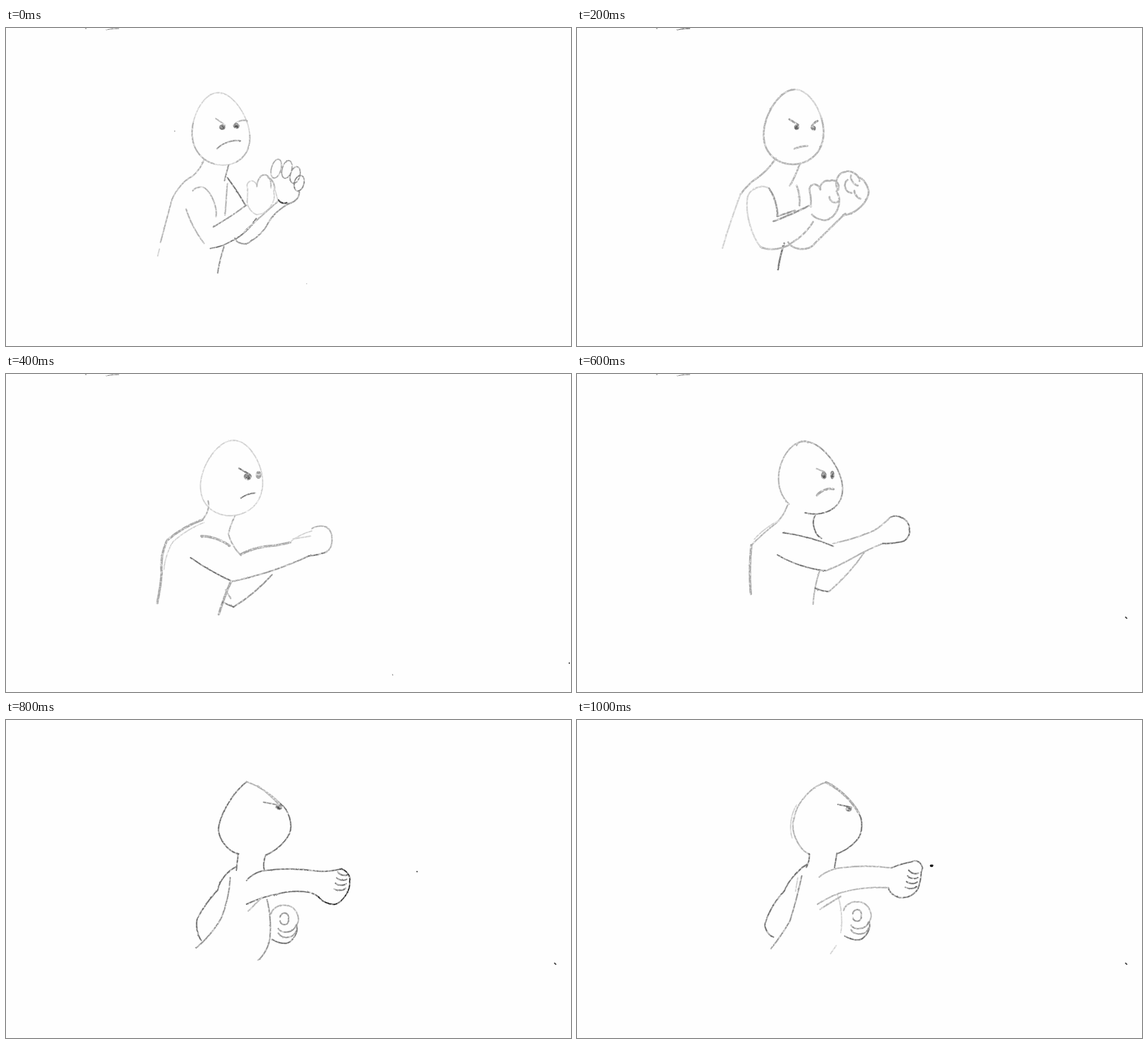
An HTML page that plays this animation: 998 by 561 pixels, repeating every 1200 ms.

```html
<!DOCTYPE html>
<html lang="en">
<head>
<meta charset="utf-8">
<title>Pencil punch</title>
<style>
  html, body { margin: 0; width: 100%; height: 100%; overflow: hidden; background: #fefefe; }
  svg { display: block; width: 100%; height: 100%; }
</style>
</head>
<body>
<svg id="stage" viewBox="0 0 998 561" fill="none" stroke-linecap="round" stroke-linejoin="round">
  <defs>
    <filter id="grain" filterUnits="userSpaceOnUse" x="0" y="0" width="998" height="561" color-interpolation-filters="sRGB">
      <feTurbulence type="fractalNoise" baseFrequency="0.25" numOctaves="3" seed="7" result="noise"/>
      <feDisplacementMap in="SourceGraphic" in2="noise" scale="2" xChannelSelector="R" yChannelSelector="G"/>
      <feGaussianBlur stdDeviation="0.45" result="soft"/>
      <feColorMatrix in="noise" values="0 0 0 0 0  0 0 0 0 0  0 0 0 0 0  2 0 0 0 -0.15" result="tooth"/>
      <feComposite in="soft" in2="tooth" operator="in"/>
    </filter>
  </defs>
</svg>
<script>
const HOLD = 200;
const FAINT = { tone: 208, width: 2.3 };
const SOFT = { tone: 178, width: 2.7 };
const MID = { tone: 150, width: 2.7 };
const DARK = { tone: 115, width: 2.6 };
const BLACK = { tone: 45, width: 2.4 };
const WIDE = { tone: 168, width: 4.3 };

const stage = document.getElementById('stage');
let page, weight;

function add(parent, tag, attrs) {
  const el = document.createElementNS('http://www.w3.org/2000/svg', tag);
  for (const k in attrs) el.setAttribute(k, attrs[k]);
  return parent.appendChild(el);
}

const gray = v => `rgb(${v},${v},${v})`;

function mark(ink, d) {
  add(page, 'path', { d, stroke: gray(ink.tone), 'stroke-width': ink.width * weight });
}

// One bend between two points; bow is its height, positive to the right of travel
function bend([x1, y1], [x2, y2, bow = 0]) {
  const dx = x2 - x1, dy = y2 - y1, len = Math.hypot(dx, dy);
  const reach = Math.max(0, 1 / 3 - 0.6 * Math.abs(bow) / len);
  const nx = -dy / len * bow * 4 / 3, ny = dx / len * bow * 4 / 3;
  return `C${x1 + dx * reach + nx},${y1 + dy * reach + ny} ` +
    `${x2 - dx * reach + nx},${y2 - dy * reach + ny} ${x2},${y2}`;
}

function stroke(ink, start, ...rest) {
  let d = `M${start[0]},${start[1]}`, last = start;
  for (const p of rest) { d += bend(last, p); last = p; }
  mark(ink, d);
}

// Egg outline, drawn between two angles measured clockwise from the tip
function egg(cx, cy, rx, ry, lean) {
  return (ink, from, to) => {
    const pts = [];
    for (let deg = from; deg <= to; deg += 5) {
      const s = Math.sin(deg * Math.PI / 180), c = Math.cos(deg * Math.PI / 180);
      pts.push([cx + lean * c + rx * s * (1 - 0.19 * c), cy - ry * c]);
    }
    mark(ink, 'M' + pts.join('L'));
  };
}

function blot(tone, x, y, rx, ry = rx) {
  add(page, 'ellipse', { cx: x, cy: y, rx, ry, fill: gray(tone) });
}

function eye(x, y, rx, ry) {
  blot(135, x, y, rx, ry);
  blot(80, x, y + 1, rx * 0.5, ry * 0.5);
}

// Open fingers spread around a palm
function fan(x, y) {
  for (let i = 0; i < 4; i++) {
    const a = (29 * i - 19) * Math.PI / 180, r = 39 - 3 * i;
    const cx = x + r * Math.sin(a), cy = y - r * Math.cos(a);
    add(page, 'ellipse', {
      cx, cy, rx: 8.5, ry: 17 - i, transform: `rotate(15 ${cx} ${cy})`,
      stroke: gray(170 - 12 * i), 'stroke-width': 2.3
    });
  }
}

function knuckles(x, y) {
  for (let i = 0; i < 4; i++) stroke(DARK, [x - 2 * i, y + 10 * i], [x + 17 - i, y + 5 + 8 * i, 3]);
}

function lowFist(x, y) {
  stroke(SOFT, [x, y], [x + 24, y - 15, -5], [x + 45, y + 20, -12]);
  stroke(DARK, [x + 45, y + 20], [x + 27, y + 52, -7], [x + 2, y + 45, -2]);
  stroke(MID, [x + 16, y + 6], [x + 31, y + 9, -9], [x + 16, y + 13, -8]);
  for (let i = 0; i < 2; i++) stroke(MID, [x + 13, y + 26 + 8 * i], [x + 44, y + 20 + 11 * i, 9]);
}

function paperEdge() {
  stroke({ tone: 60, width: 1.2 }, [177, 3], [199, 1, -0.5]);
  blot(120, 141, 1, 1.5, 0.8);
}

const paperNick = () => stroke(BLACK, [969, 429], [971, 431]);

function guard() {
  const head = egg(379, 178, 50, 64, -4);
  paperEdge();
  head(FAINT, -180, 180);
  head(SOFT, -165, -80);
  head(SOFT, 100, 155);
  stroke(SOFT, [371, 160], [387, 171]);
  stroke(SOFT, [402, 172], [426, 164, -4]);
  eye(382, 175, 5.5, 5);
  eye(407, 173, 5.5, 5);
  stroke(MID, [373, 213], [414, 199, -5]);
  // torso
  stroke(SOFT, [350, 232], [330, 261, -2], [290, 314, 7], [273, 378]);
  stroke(FAINT, [271, 390], [268, 402]);
  stroke(MID, [393, 242], [386, 269]);
  stroke(DARK, [391, 264], [423, 313, -1]);
  stroke(SOFT, [391, 274], [387, 330]);
  stroke(MID, [385, 386], [374, 432, 1]);
  // near arm and hand
  stroke(SOFT, [330, 287], [352, 283, -4], [371, 333, -6]);
  stroke(SOFT, [318, 319], [350, 380, 3]);
  stroke(MID, [366, 351], [424, 313, 1]);
  stroke(DARK, [361, 389], [400, 375, 2], [442, 336, 4]);
  stroke(FAINT, [426, 311], [427, 284], [443, 277, -11]);
  stroke(SOFT, [443, 280], [468, 282, -22]);
  stroke(SOFT, [463, 264], [473, 288, -5]);
  stroke(FAINT, [473, 290], [442, 329, -11], [426, 309, -3]);
  // far arm and hand
  fan(490, 285);
  stroke(MID, [518, 288], [482, 304, -13]);
  stroke(FAINT, [473, 279], [480, 302]);
  stroke(BLACK, [481, 303], [496, 308, 3]);
  stroke(SOFT, [480, 306], [422, 358]);
  stroke(MID, [505, 308], [462, 346, 5], [432, 376, -3], [404, 371, -7]);
  // specks
  blot(150, 298, 182, 1.2);
  blot(170, 531, 451, 1);
}

function clench() {
  const head = egg(383, 174.5, 52, 66, 2);
  paperEdge();
  head(SOFT, -180, 0);
  head(SOFT, 75, 180);
  head(FAINT, 5, 75);
  stroke(MID, [375, 161], [391, 171]);
  stroke(MID, [425, 164], [414, 176, 2]);
  eye(388, 175, 4.5, 5);
  eye(418, 177, 4, 4.5);
  stroke(SOFT, [384, 213], [407, 208, -1]);
  // torso
  stroke(SOFT, [351, 230], [313, 268, -3], [289, 293, 1]);
  stroke(FAINT, [289, 293], [257, 388, 1]);
  stroke(SOFT, [393, 241], [376, 278, -1]);
  stroke(SOFT, [388, 278], [393, 313, -2]);
  stroke(DARK, [366, 380], [355, 426, 1]);
  // near arm and hand
  stroke(FAINT, [324, 386], [301, 300, -8], [339, 283, -10]);
  stroke(MID, [339, 283], [354, 332, -4], [385, 322]);
  stroke(MID, [347, 341], [409, 314, 1]);
  stroke(SOFT, [324, 386], [382, 377, 8], [417, 342, 3]);
  stroke(SOFT, [413, 315], [411, 288, 1], [428, 282, -9]);
  stroke(SOFT, [430, 285], [446, 270, -6], [458, 288, -10]);
  stroke(SOFT, [459, 290], [440, 339, -12], [415, 329, -3]);
  stroke(SOFT, [446, 298], [461, 306, 5]);
  // far arm and hand
  stroke(SOFT, [462, 285], [473, 254, -9], [499, 270, -7]);
  stroke(SOFT, [478, 268], [485, 291, 8]);
  stroke(SOFT, [484, 260], [496, 278, 4]);
  stroke(SOFT, [490, 287], [501, 301, 3]);
  stroke(SOFT, [500, 264], [515, 292, -4], [470, 330, -9]);
  stroke(SOFT, [474, 327], [420, 380], [373, 378, -11]);
}

function reach() {
  paperEdge();
  egg(399, 183.5, 54, 66.5, 3)(FAINT, -180, 180);
  stroke(DARK, [411, 166], [427, 175]);
  eye(427, 181, 7, 6.5);
  blot(155, 446, 178, 5, 7);
  stroke(DARK, [415, 219], [440, 210, -2]);
  // torso
  stroke(SOFT, [357, 224], [345, 258, -5]);
  stroke(WIDE, [347, 257], [285, 293, 3], [275, 350, 4], [267, 404, -1]);
  stroke(FAINT, [350, 262], [295, 296, 3], [279, 345, 3]);
  stroke(SOFT, [404, 251], [393, 282, 1], [415, 320, 3]);
  stroke(WIDE, [397, 367], [376, 424, 1]);
  // near arm
  stroke(WIDE, [345, 286], [395, 303, -4]);
  stroke(WIDE, [415, 318], [460, 304, -2], [502, 297, 1]);
  stroke(FAINT, [502, 296], [540, 277, -2]);
  stroke(FAINT, [507, 291], [538, 286]);
  stroke(DARK, [326, 324], [400, 366, 2]);
  stroke(MID, [400, 366], [535, 321, 4]);
  stroke(DARK, [535, 321], [566, 314, 1]);
  stroke(SOFT, [566, 314], [566, 270, 10], [540, 273, 3]);
  // far arm
  stroke(MID, [470, 354], [402, 411, -3]);
  stroke(DARK, [402, 411], [383, 403]);
  stroke(SOFT, [388, 381], [397, 396]);
  // specks
  blot(50, 995, 510, 1.2);
  blot(130, 683, 531, 1);
}

function lift() {
  const head = egg(411, 183, 55, 64, -9);
  paperEdge();
  paperNick();
  head(SOFT, -137, 25);
  head(MID, 25, 150);
  head(DARK, 150, 195);
  stroke(SOFT, [388, 126], [408, 121, -5]);
  stroke(SOFT, [423, 167], [438, 173]);
  eye(436, 179, 5, 7);
  eye(451, 178, 3.8, 7.5);
  stroke(WIDE, [424, 214], [453, 203, -4]);
  // torso
  stroke(SOFT, [372, 231], [352, 263, -2], [308, 302, 1]);
  stroke(FAINT, [358, 258], [313, 292, 3]);
  stroke(WIDE, [308, 302], [307, 388, 2]);
  stroke(DARK, [421, 249], [432, 290, 8]);
  stroke(SOFT, [429, 346], [417, 406, 2]);
  // near arm
  stroke(DARK, [364, 280], [453, 304, -3]);
  stroke(DARK, [354, 319], [440, 347, 5]);
  stroke(SOFT, [452, 299], [525, 276, 2], [552, 254, 1]);
  stroke(SOFT, [440, 347], [488, 324, 1], [540, 299, -1]);
  stroke(DARK, [552, 254], [587, 275, -12], [573, 296, -5], [540, 299, -1]);
  // far arm
  stroke(SOFT, [508, 314], [445, 384, -3]);
  stroke(DARK, [445, 384], [421, 378, -1]);
}

function punch() {
  paperNick();
  // head
  stroke(DARK, [425, 109], [376, 186, 7], [411, 236, 11]);
  stroke(SOFT, [425, 109], [485, 148, -4]);
  stroke(SOFT, [445, 116], [481, 148, -1]);
  stroke(DARK, [485, 148], [501, 200, -8], [459, 238, -5]);
  stroke(MID, [455, 145], [481, 150]);
  eye(482, 154, 6, 5);
  // neck and torso
  stroke(DARK, [410, 237], [407, 265]);
  stroke(DARK, [459, 238], [456, 264, 2]);
  stroke(MID, [461, 317], [466, 385, -3], [445, 424, -4]);
  // rear arm
  stroke(DARK, [407, 259], [374, 300, 6], [338, 350, 2], [345, 389, 4]);
  stroke(MID, [396, 278], [380, 350, -3], [336, 402, -3]);
  // punching arm
  stroke(DARK, [425, 283], [455, 266, -3], [545, 266, -3], [590, 263, 2]);
  stroke(DARK, [425, 325], [480, 307, -2], [535, 304, -3], [552, 312, -1]);
  stroke(SOFT, [452, 313], [428, 337]);
  stroke(BLACK, [590, 263], [607, 285, -6], [582, 325, -7], [552, 312, -4]);
  knuckles(586, 268);
  lowFist(468, 342);
  blot(40, 726, 267.5, 1.2);
}

function settle() {
  paperNick();
  // head
  stroke(SOFT, [440, 110], [384, 172, 11], [411, 237, 12]);
  stroke(FAINT, [388, 150], [380, 208, 6]);
  stroke(WIDE, [440, 110], [498, 165, -6]);
  stroke(DARK, [498, 165], [496, 210, -6], [459, 236, -3]);
  stroke(DARK, [461, 149], [485, 154]);
  eye(480, 157, 5.5, 4.5);
  // neck and torso
  stroke(DARK, [410, 236], [405, 260, -2]);
  stroke(DARK, [459, 235], [455, 260]);
  stroke(FAINT, [460, 308], [466, 375, -4]);
  stroke(FAINT, [458, 398], [448, 412]);
  // rear arm
  stroke(DARK, [409, 253], [366, 302, 5], [332, 360, 4], [347, 383, 4]);
  stroke(MID, [397, 275], [376, 355, -1], [343, 403, -1]);
  stroke(FAINT, [390, 278], [386, 302]);
  // punching arm
  stroke(SOFT, [428, 277], [465, 261, -3], [555, 261, -3]);
  stroke(SOFT, [425, 325], [462, 306, -1], [550, 296, -4]);
  stroke(SOFT, [466, 311], [429, 334]);
  stroke(DARK, [555, 261], [592, 250, -1], [608, 268, -9], [603, 296, -1], [578, 313, -4], [550, 296, -6]);
  knuckles(586, 265);
  lowFist(471, 336);
  blot(10, 626.5, 257, 3.2, 2.3);
}

function sketch(draw) {
  page = add(stage, 'g', { filter: 'url(#grain)', display: 'none' });
  weight = draw === clench ? 1.25 : 1;
  draw();
  return page;
}

const poses = [guard, clench, reach, lift, punch, settle].map(sketch);

function render(ms) {
  const now = Math.floor(ms / HOLD) % poses.length;
  poses.forEach((g, i) => g.setAttribute('display', i === now ? 'inline' : 'none'));
}

const start = performance.now();
function tick() {
  render(performance.now() - start);
  requestAnimationFrame(tick);
}
tick();
</script>
</body>
</html>
```
